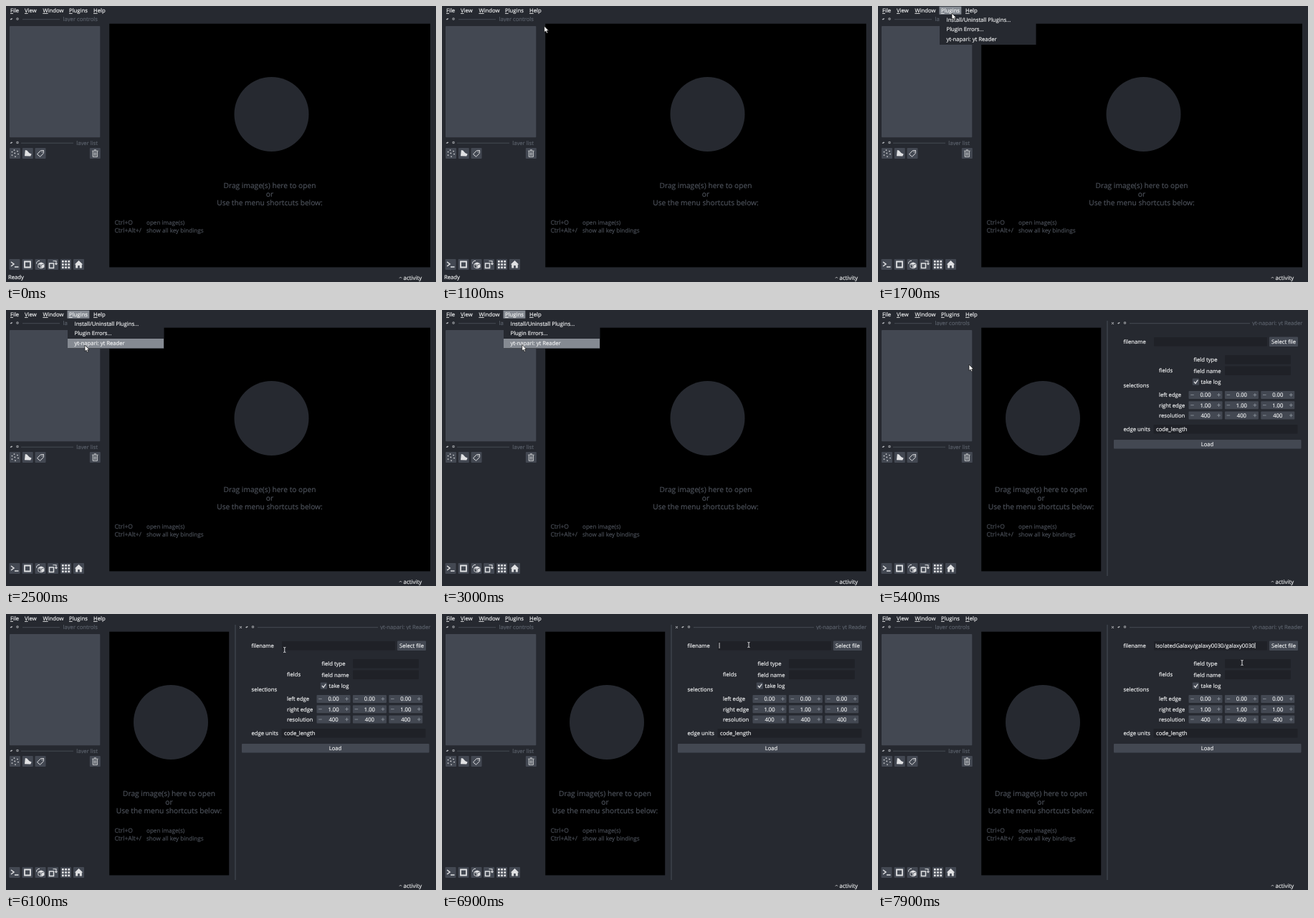
Write an HTML page that moves like this. It is 600 px wide and 385 px high and loops after 8 s.

```html
<!DOCTYPE html>
<html lang="en">
<head>
<meta charset="utf-8">
<title>Opening a reader panel</title>
<style>
  html, body { margin: 0; width: 100%; height: 100%; overflow: hidden; background: #262930; }
  svg { display: block; width: 600px; height: 385px; }
  text { font-family: "Open Sans", "Noto Sans", sans-serif; font-size: 7.7px; color: #f0f1f2;
         fill: currentColor; stroke: currentColor; stroke-width: .16px;
         text-rendering: geometricPrecision; white-space: pre; }
  .dim { color: #5c626c; }
  .hint { color: #4c515a; font-size: 8.1px; }
  .keys { color: #4c515a; font-size: 8.5px; }
  .big { color: #4e535c; font-size: 10.2px; }
  .status { font-size: 7.9px; }
  .key { text-decoration: underline; text-decoration-thickness: .7px; }
</style>
</head>
<body>
<svg id="stage" viewBox="0 0 600 385"></svg>
<script>
const NS = 'http://www.w3.org/2000/svg';
const stage = document.getElementById('stage');
const BG = '#262930', FACE = '#434852', FIELD = '#1f2127', HOVER = '#858a92', INK = '#e0e1e3';

function add(parent, tag, attrs = {}, content) {
  const node = document.createElementNS(NS, tag);
  for (const name in attrs) node.setAttribute(name, attrs[name]);
  if (content !== undefined) node.textContent = content;
  parent.appendChild(node);
  return node;
}
const group = (parent = stage, attrs) => add(parent, 'g', attrs);
const box = (p, x, y, width, height, fill, rx = 0) => add(p, 'rect', { x, y, width, height, fill, rx });
const label = (p, x, y, str, cls = '', anchor = 'start') =>
  add(p, 'text', { x, y, class: cls, 'text-anchor': anchor }, str);
const line = (p, d, stroke, width = 1) =>
  add(p, 'path', { d, stroke, fill: 'none', 'stroke-width': width });
const shape = (p, d, fill = INK) => add(p, 'path', { d, fill });
const show = (node, on) => node.setAttribute('visibility', on ? 'visible' : 'hidden');

box(stage, 0, 0, 600, 385, BG);

// Menu bar
const plugHover = box(stage, 85.5, .7, 30.8, 11, HOVER);
for (const [x, name] of [[6, 'File'], [26, 'View'], [51.5, 'Window'], [88, 'Plugins'], [122, 'Help']]) {
  const item = label(stage, x, 9, '');
  add(item, 'tspan', { class: 'key' }, name[0]);
  add(item, 'tspan', {}, name.slice(1));
}

// Dock title: small buttons, rule, label with its lower edge cut off
function dockTitle(p, x, y, x1, x2, right, str, id) {
  shape(p, `M${x - 2} ${y + .7}l2.4 -1.8 1.5 .9 -2.4 1.7z`, '#b9bbbf');
  line(p, `M${x + 7.4} ${y - 1.1}h2.2v2.2h-2.2z`, '#b9bbbf', .8);
  line(p, `M${x1} ${y + .7}H${x2}`, '#454a53');
  const clip = add(p, 'clipPath', { id });
  box(clip, 0, y - 6, 600, 9.7, '#000');
  label(group(p, { 'clip-path': `url(#${id})` }), right, y + 3.3, str, 'dim', 'end');
}
dockTitle(stage, 7.5, 18, 23, 75, 128, 'layer controls', 'c1');
dockTitle(stage, 7.5, 190.5, 21, 94, 128, 'layer list', 'c2');
box(stage, 5, 28, 126.3, 155.3, FACE, 1);

// Tool buttons, each icon drawn in a 15 px square
function tool(x, y, draw) {
  const g = group(stage, { transform: `translate(${x} ${y})` });
  box(g, 0, 0, 15, 15, FACE, 1);
  draw(g);
}
const dots = (g, pts, r) => pts.forEach(([cx, cy]) => add(g, 'circle', { cx, cy, r, fill: INK }));
tool(5, 198, g => dots(g, [[6.5, 3], [11, 4.5], [3.5, 5.5], [7.3, 7.3], [12, 8.5], [3.5, 10], [8, 12]], .85));
tool(22.8, 198, g => shape(g, 'M4 3L6.5 3.6Q9 7.5 12.8 8.6L11.5 11.5 3.2 11.2z'));
tool(40.5, 198, g => {
  line(g, 'M3 8.7L7.8 3.8L12 3.4L11.8 7.5L7 12.2z', INK, 1);
  dots(g, [[9.9, 5.6]], .7);
});
tool(116.8, 198, g =>
  line(g, 'M3.3 4.2H11.7M6 2.8H9M4.4 5V12.3H10.6V5M6.5 6V10.8M8.5 6V10.8', INK, .9));
tool(4.5, 353, g => line(g, 'M2.5 4L6.5 7 2.5 10M7.5 11H13', INK, 1.5));
tool(22.5, 353, g => line(g, 'M3.5 3.5H11.5V11.5H3.5z', INK, 1.8));
tool(40.5, 353, g => {
  shape(g, 'M4 6.2L8.5 4.5 13 6.2 8.5 8z');
  shape(g, 'M8.9 8.7L13 7.1V11.6L8.9 13.4z');
  line(g, 'M4.4 7.2L8.1 8.7V13L4.4 11.4z', INK, .8);
  line(g, 'M2 6.5Q2 2.5 6.5 2.3', INK, 1);
});
tool(58, 353, g => {
  line(g, 'M2.5 6H8.5V12.5H2.5z', INK, 1.5);
  line(g, 'M7.5 2.8H12V7.5M10.4 6L12 7.7 13.5 6', INK, 1.1);
});
tool(76, 353, g => {
  for (let i = 0; i < 9; i++) box(g, 2 + i % 3 * 4.2, 2 + Math.floor(i / 3) * 4.2, 2.7, 2.7, INK);
});
tool(94, 353, g => shape(g, 'M7.5 2L13.2 7.5H11.8V12.6H8.8V9H6.2V12.6H3.2V7.5H1.8z'));

const ready = label(stage, 3, 381.3, 'Ready');
line(stage, 'M549 379.6L550.5 378.1 552 379.6', INK, .9);
label(stage, 554.5, 381.8, 'activity', 'status');

// Viewer canvas
const view = box(stage, 144.2, 24.7, 447.8, 339.7, '#000');
const welcome = group();
add(welcome, 'circle', { cx: 370.5, cy: 151, r: 52, fill: BG });
label(welcome, 368, 254, 'Drag image(s) here to open', 'big', 'middle');
label(welcome, 368, 266.3, 'or', 'big', 'middle');
label(welcome, 368, 278, 'Use the menu shortcuts below:', 'big', 'middle');
label(stage, 151.5, 305, 'Ctrl+O', 'keys');
label(stage, 196, 305, 'open image(s)', 'hint');
label(stage, 151.5, 316, 'Ctrl+Alt+/', 'keys');
label(stage, 196, 316, 'show all key bindings', 'hint');

// Reader panel
const panel = group();
line(panel, 'M320 15V371', '#3f444d', 1.4);
line(panel, 'M326 17L329 20M329 17L326 20', '#c9cbce', .9);
dockTitle(panel, 336, 18, 351, 519, 592.5, 'yt-napari: yt Reader', 'c3');
for (const [x, y, str] of [
  [342.5, 46.7, 'filename'], [440.5, 72, 'field type'], [440.5, 87.7, 'field name'],
  [392, 87, 'fields'], [342.5, 108, 'selections'], [450.5, 103, 'take log'],
  [392, 121.2, 'left edge'], [392, 135.5, 'right edge'], [392, 149.8, 'resolution'],
  [342.5, 169, 'edge units']
]) label(panel, x, y, str);
for (const [x, y, w] of [[385, 38, 158], [484, 63, 92], [484, 78.5, 92], [384.5, 160, 201]])
  box(panel, x, y, w, 12.5, FIELD, 1);
label(panel, 388, 169.3, 'code_length');
box(panel, 546, 37.5, 40, 13.5, FACE, 1);
label(panel, 566, 46.9, 'Select file', '', 'middle');
box(panel, 438.8, 95.5, 9.2, 9.2, FACE, 1);
line(panel, 'M441 100L443 102.4 446.3 97.6', INK, 1.2);
['0.00', '1.00', '400'].forEach((value, row) => {
  for (let col = 0; col < 3; col++) {
    const x = 433.5 + col * 50.4, y = 113 + row * 14.3;
    box(panel, x, y, 47, 11, FACE, 1);
    line(panel, `M${x + 2.7} ${y + 5.4}h4.6M${x + 39.7} ${y + 5.4}h4.6M${x + 42} ${y + 3.1}v4.6`, '#8a9099', .9);
    label(panel, x + 23.5, y + 8.3, value, '', 'middle');
  }
});
box(panel, 329, 181, 261.5, 12.5, FACE, 1);
label(panel, 459.5, 190, 'Load', '', 'middle');
const path = label(panel, 387, 46.7, 'IsolatedGalaxy/galaxy0030/galaxy0030');
const caret = box(panel, 0, 40, .9, 8, INK);

// Drop-down menu
const menu = group();
box(menu, 86, 12, 134.5, 42, BG);
const itemHover = box(menu, 86, 0, 134, 13.3, HOVER);
label(menu, 95.5, 22, 'Install/Uninstall Plugins...');
label(menu, 95.5, 35.2, 'Plugin Errors...');
label(menu, 95.5, 49.2, 'yt-napari: yt Reader');

// Pointers
const arrow = add(stage, 'path', {
  d: 'M0 0V8.6L2 6.9 3.4 10 4.9 9.3 3.6 6.4H6.2z', fill: '#fff', stroke: '#111', 'stroke-width': .7
});
const beam = line(stage, 'M-1.6 -3.6Q0 -3.6 0 -2.6Q0 -3.6 1.6 -3.6M0 -2.8V2.8M-1.6 3.6Q0 3.6 0 2.6Q0 3.6 1.6 3.6', '#e8e9eb', .9);

// Pointer stops: time, x, y
const stops = [
  [700, 216, 74], [1000, 160, 36], [1300, 108, 12], [1500, 102, 9], [1700, 103, 10],
  [2000, 106, 20], [2100, 106, 20], [2300, 109, 37], [2500, 110, 49], [2800, 112, 50],
  [2900, 112, 50], [3200, 111, 45], [5300, 111, 45], [5400, 127, 76], [5800, 280, 62],
  [6200, 425, 46], [6400, 446, 41], [6700, 431, 43], [6900, 428, 43], [7200, 429, 44],
  [7500, 455, 50], [7800, 505, 67], [7900, 508, 68]
];
function pointerAt(t) {
  const i = stops.findIndex(s => s[0] > t);
  if (i < 0) return stops[stops.length - 1].slice(1);
  const [t0, x0, y0] = stops[i - 1], [t1, x1, y1] = stops[i];
  const k = (t - t0) / (t1 - t0);
  return [x0 + (x1 - x0) * k, y0 + (y1 - y0) * k];
}
const within = (x, y, l, t, r, b) => x >= l && x <= r && y >= t && y <= b;

function render(t) {
  const docked = t >= 5400, pasted = t >= 7300;
  show(plugHover, t >= 1300 && !docked);
  show(ready, t < 1300);
  show(panel, docked);
  view.setAttribute('width', docked ? 167 : 447.8);
  welcome.setAttribute('transform', `translate(${docked ? -140.5 : 0} 0)`);

  const open = t >= 1500 && t < 3800;
  menu.style.display = open ? '' : 'none';
  path.style.display = docked && pasted ? '' : 'none';
  caret.style.display = t >= 6700 ? '' : 'none';
  caret.setAttribute('x', pasted ? 387.2 + path.getComputedTextLength() : 386.6);

  const seen = t >= 700;
  const [x, y] = seen ? pointerAt(t) : [0, 0];
  const row = y < 12 ? -1 : y < 26 ? 0 : y < 40 ? 1 : 2;
  itemHover.style.display = row < 0 ? 'none' : '';
  itemHover.setAttribute('y', [12.5, 26, 40][Math.max(row, 0)]);

  const typing = docked && (within(x, y, 385, 38, 543, 51) || within(x, y, 484, 63, 576, 76) || t >= 6300);
  show(arrow, seen && !typing);
  show(beam, seen && typing);
  for (const p of [arrow, beam]) p.setAttribute('transform', `translate(${x} ${y})`);
}

const start = performance.now();
function tick(now) {
  const t = Math.max(0, now - start) % 8000;
  render(Math.floor(t / 100) * 100);
  requestAnimationFrame(tick);
}
render(0);
requestAnimationFrame(tick);
</script>
</body>
</html>
```
